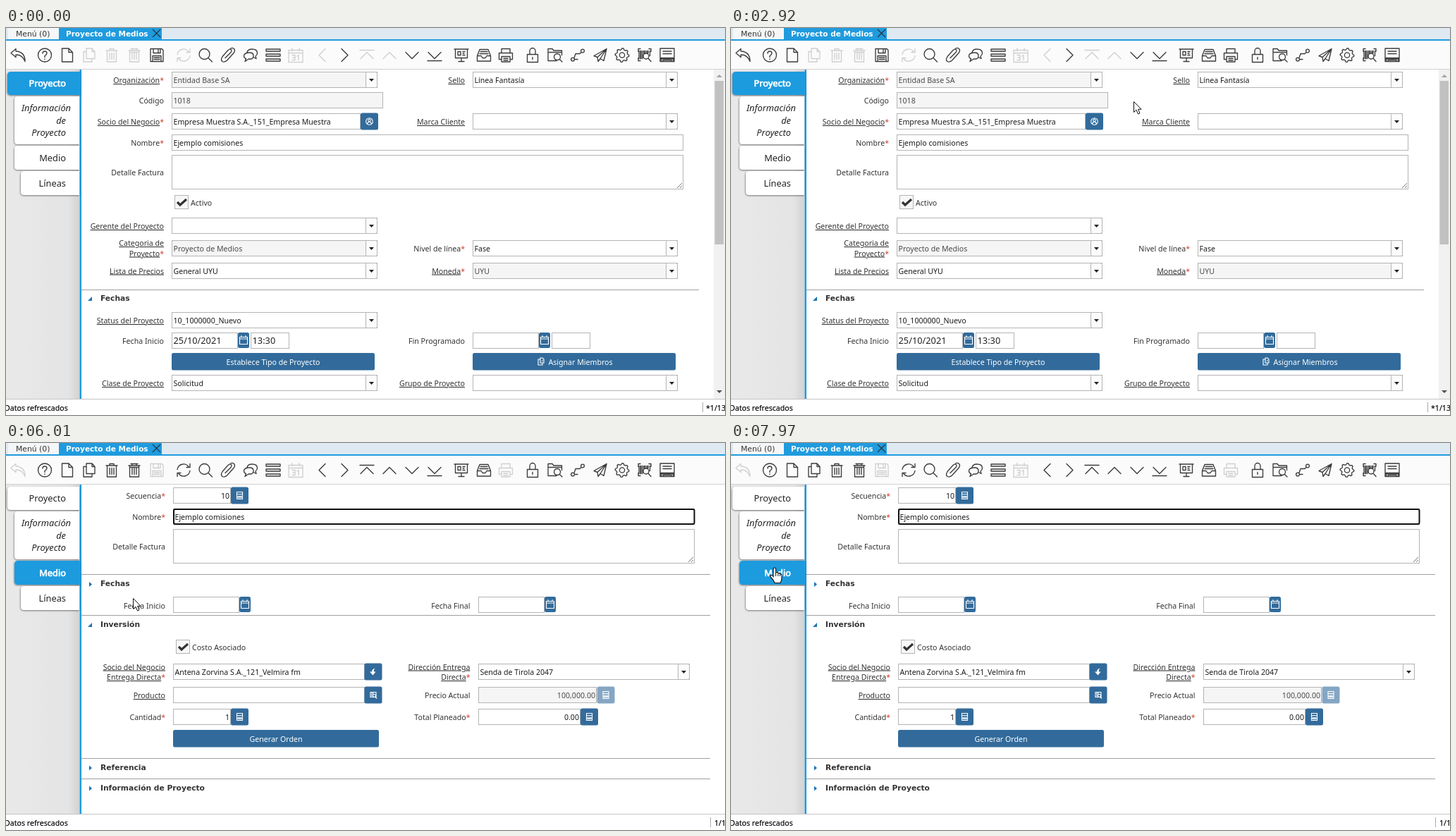
These frames come from a looping animation (1020 px wide and 549 px high, 8000 ms). An HTML page:

```html
<!DOCTYPE html>
<html lang="es">
<head>
<meta charset="utf-8">
<title>Proyecto de Medios</title>
<style>
html, body { margin: 0; width: 100%; height: 100%; overflow: hidden; background: #fff; }
svg { display: block; width: 100vw; height: 100vh; }
text { font: 10.6px "Noto Sans", "Open Sans", sans-serif; fill: #333; white-space: pre; }
.value { fill: #1c1c1c; }
.muted { fill: #4a4a4a; }
.date { font-size: 12.8px; fill: #222; }
.head { font: bold 10.7px "DejaVu Sans", sans-serif; }
.menu { font: 10.8px "DejaVu Sans", sans-serif; }
.title { font: bold 10.5px "DejaVu Sans", sans-serif; fill: #fff; }
.tab { font-size: 12.8px; fill: #222; }
.italic { font-style: italic; }
.active { fill: #fff; stroke: #fff; stroke-width: .7px; }
.white { fill: #fff; }
.status { fill: #000; stroke: #000; stroke-width: .15px; }
.u { text-decoration: underline; }
.req { fill: #d0402b; }
.icon { fill: none; stroke: #3c3c3c; stroke-width: 1.35; stroke-linejoin: round; stroke-linecap: round; }
.off { stroke: #d0d0d0; }
.tiny { fill: none; stroke: #fff; stroke-width: 1.1; }
</style>
</head>
<body>
<svg id="stage" viewBox="0 0 1020 549" preserveAspectRatio="none"></svg>
<script>
const LOOP = 8000, SWITCH = 5250, FOCUS = 5310, BLINK = 530;
const BLUE = '#1f9bde', BUTTON = '#326b9b', BORDER = '#b4b4b4';

const rect = (x, y, w, h, fill, extra = '') =>
  `<rect x="${x}" y="${y}" width="${w}" height="${h}" fill="${fill}" ${extra}/>`;
const path = (d, extra) => `<path d="${d}" ${extra}/>`;
const text = (x, y, s, cls = '', anchor = 'start') =>
  `<text x="${x}" y="${y + 4}" class="${cls}" text-anchor="${anchor}">${s}</text>`;
const at = (x, y, s) => `<g transform="translate(${x} ${y})">${s}</g>`;
const circle = (x, y, r) => `M${x - r} ${y}a${r} ${r} 0 1 0 ${2 * r} 0a${r} ${r} 0 1 0 ${-2 * r} 0`;

// Labels: "_" in front underlines, "*" at the end marks a required field.
function label(x, y, s) {
  const cls = s[0] === '_' ? 'u' : '', star = s.endsWith('*');
  const words = s.replace(/^_|\*$/g, '');
  return text(x, y, `<tspan class="${cls}">${words}</tspan>${star ? '<tspan class="req">*</tspan>' : ''}`, '', 'end');
}

const fields = [[], []];
let page = 0;
function box(x, y, w, h, value = '', o = {}) {
  fields[page].push([x, y, w, h]);
  const cls = o.cls || (o.gray ? 'muted' : 'value');
  return rect(x + .5, y + .5, w - 1, h - 1, o.gray ? '#f5f5f5' : '#fff', `stroke="${BORDER}"`) +
    (o.right ? text(x + w - 2, y + h / 2 + .5, value, cls, 'end') : text(x + 2.5, y + h / 2 + .5, value, cls));
}
const combo = (x, y, w, value, gray) => box(x, y, w, 23, value, { gray }) +
  rect(x + w - 16.5, y + .5, 16, 22, '#fcfcfc', `stroke="${BORDER}" rx="2"`) +
  path(`M${x + w - 12} ${y + 10}h7l-3.5 4z`, 'fill="#222"');
const area = (x, y, w, h) => box(x, y, w, h) +
  path(`M${x + w - 9} ${y + h - 2}l7-7m-3 7l3-3`, 'stroke="#777" fill="none"');
const button = (x, y, w, h, inner = '', fill = BUTTON) =>
  rect(x, y, w, h, fill, 'rx="2.5"') + at(x + w / 2, y + h / 2, inner);
const wide = (x, y, w, caption) => button(x, y, w, 24.5, text(0, .3, caption, 'white', 'middle'));
const tiny = d => path(d, 'class="tiny"');
// Square button that closes a 23 px high field.
const side = (x, y, inner, fill) => button(x, y - .5, 25, 24, inner, fill);
const calcIcon = tiny('M-4-5H4V5H-4ZM-4-2H4M-2 0V4M0 0V4M2 0V4M-4 2H4');
const calc = (x, y, fill) => side(x, y, calcIcon, fill);
const date = (x, y, value) => box(x, y, 94, 23, value, { cls: 'date' }) +
  button(x + 94, y, 16, 22, tiny('M-5.5-4.5H5.5V5.5H-5.5ZM-5.5-2H5.5M-3-7V-4M3-7V-4'));
const check = (x, y, caption) =>
  rect(x + .5, y + .5, 19, 19, '#f7f7f7', `stroke="${BORDER}"`) +
  path(`M${x + 4} ${y + 10}l4 4l9-8`, 'stroke="#333" stroke-width="3.2" fill="none"') +
  text(x + 23, y + 10.5, caption);
const rule = (y, end) => rect(107, y, end - 107, 1, '#a0a0a0');
const section = (y, name, open) => text(134, y, name, 'head') +
  path(open ? `M122 ${y - 2}v6h-6z` : `M118 ${y - 2}l4 3.5l-4 3.5z`, 'fill="#1b75b5"');

const gearShape = Array.from({ length: 32 }, (_, i) => {
  const a = i * Math.PI / 16, r = i % 4 < 2 ? 9.8 : 7.8;
  return `${i ? 'L' : 'M'}${(r * Math.cos(a)).toFixed(1)} ${(r * Math.sin(a)).toFixed(1)}`;
}).join('') + 'Z';
const trash = 'M-8-6.5H8M-3-6.5V-9H3V-6.5M-6.5-6.5V9.5H6.5V-6.5M-3-3V6M0-3V6M3-3V6';
const up = 'M-9 5L0-4L9 5', down = 'M-9-4L0 5L9-4';

// x, shape, page on which it is disabled (2 = both)
const icons = [
  [17, 'M-3-9L-10-3L-3 3V-.5Q6-1 10 9Q10-5-3-5.5Z', 1],
  [55, circle(0, 0, 9.5) + 'M-3-2.5Q-3-5.5 0-5.5T3-2.5Q3-1 0 1V3M0 5.5V6'],
  [87, 'M-7.5-9.5H2L7.5-4V9.5H-7.5ZM2-9.5V-4H7.5'],
  [118, 'M-4-9.5H4L8-5V5H-4ZM-4-5H-8V9.5H4V5M4-9.5V-5H8', 0],
  [150, trash, 0],
  [182, trash + 'M-6.5-4H6.5M-5-9H5', 0],
  [214, 'M-9-9H7L9-7V9H-9ZM-5-9V-3H5V-9M2-8V-4M-6 9V1H6V9M-4 3.5H4M-4 6H4', 1],
  [252, 'M-9-1A9 9 0 0 1 7-5M9-9V-4H4M9 1A9 9 0 0 1-7 5M-9 9V4H-4', 0],
  [283, circle(-1.5, -1.5, 7.5) + 'M4 4L9.5 9.5'],
  [315, 'M-4 4L4-4Q6-7 4-8Q2-9 0-7L-8 2Q-11 7-8 9Q-5 11-1 7L8-3Q11-7 8-9.5Q6-11 3-9'],
  [347, 'M-5-4Q-4-8.5 2-8.5Q9.5-8.5 9.5-3Q9.5 0 7 1.5L8 5L4 3M-3-3.5H0Q4-3 4 1Q4 5 0 5.5H-3L-8 9L-6.5 5Q-9.5 4-9.5 1Q-9-3-3-3.5Z'],
  [379, 'M-10-8.5H10V-5.5H-10ZM-10-1.5H10V1.5H-10ZM-10 5.5H10V8.5H-10Z'],
  [411, 'M-10-7H10V10H-10ZM-10-3H10M-5-10V-6M5-10V-6M-5 0H-1V7H-5M-1 3.5H-4M2 1.5L4 0V7', 2],
  [449, 'M4-9L-5 0L4 9', 0],
  [480, 'M-4-9L5 0L-4 9'],
  [512, up + 'M-10-7H10', 0],
  [544, up, 0],
  [576, down],
  [608, down + 'M-10 8H10'],
  [646, 'M-10-8.5H10M-8.5-8.5V4H8.5V-8.5M0 4V8M-4 9H4M-5-5H-1V0H-5ZM2-5H5M2-2.5H4M2 0H5'],
  [678, 'M-9.5 1L-6-8H6L9.5 1V8.5H-9.5ZM-9.5 1H-4L-2 4H2L4 1H9.5M-5-5H5M-6-2H6'],
  [709, 'M-6-3V-9H6V-3M-6 6H-9.5V-3H9.5V6H6M-6 2H6V9.5H-6ZM-3 4.7H3M-3 7.2H3', 1],
  [747, 'M-7.5-1H7.5V10H-7.5ZM-4-1V-6A4 4 0 0 1 4-6V-1M0 3V6'],
  [779, 'M2 8H-10V-9H-4L-2-6.5H9.5V0M-10-4H9.5' + circle(3, 2.5, 4.5) + 'M6.5 6L10 9.5'],
  [811, circle(-7, 6, 2.4) + circle(7, -6, 2.4) + 'M-5 4L-3-2H3L5-4M-4.5 6H0'],
  [843, 'M9-9L-9 1L-4 3L-3 9L0 5L5 8ZL-4 3M9-9L0 5'],
  [874, gearShape + circle(0, 0, 3.6)],
  [906, 'M-9-5V-9H-6M6-9H9V-5M-9 4V8H-6M-8-6V5M-6-6V5M-5-6V5M-3-6V5M-1-6V-2M0-6V-2M2-6V-3M4-6V-3M5-6V-3M7.5-6V1' + circle(2, 1.5, 4) + 'M5 4.5L9 9'],
  [938, 'M-10-9.5H10V4H-10ZM-6-5.5H6M-6-2H6M-10 5.3H10M-10 4V9H-6M-8.5 5V9M-6 9V7H6V9ZM6 9H10V4M8.5 5V9']
];
const toolbar = p => icons.map(([x, d, off]) =>
  at(x, 38.5, path(d, `class="icon ${off === 2 || off === p ? 'off' : ''}"`))).join('');

const tabs = [[2, 62, 33, 'Proyecto'], [12, 97, 68], [12, 167, 34, 'Medio'], [21, 203, 34, 'Líneas']];
const sidebar = current => tabs.map(([x, y, h, name], i) => {
  const on = i === current, r = 5, right = on ? 106 : 104;
  const d = `M${right} ${y}H${x + r}q${-r} 0 ${-r} ${r}v${h - 2 * r}q0 ${r} ${r} ${r}H${right}z`;
  return path(d, `fill="${on ? BLUE : '#fff'}" filter="url(#shade)"`) +
    (name ? text(85, y + h / 2 + .5, name, 'tab ' + (on ? 'active' : ''), 'end')
      : text(92, 114, 'Información', 'tab italic', 'end') + text(85, 131.5, 'de', 'tab italic', 'end') +
        text(85, 149, 'Proyecto', 'tab italic', 'end'));
}).join('');

const personIcon = tiny(circle(0, 0, 4.8) + circle(0, -1.5, 1.7) + 'M-3 3.5Q-2 .5 0 .5T3 3.5');

function projectPage() {
  const l = 224, r = 651, x = 235, x2 = 662;
  return label(l, 74, '_Organización*') + combo(x, 62, 292, 'Entidad Base SA', true) +
    label(r, 74, '_Sello') + combo(x2, 62, 291, 'Línea Fantasía') +
    label(l, 103, 'Código') + box(x, 91, 300, 23, '1018', { gray: true }) +
    label(l, 133, '_Socio del Negocio*') + box(x, 121, 268, 23, 'Empresa Muestra S.A._151_Empresa Muestra') +
    side(503, 121, personIcon) +
    label(r, 133, '_Marca Cliente') + combo(x2, 121, 291) +
    label(l, 163, 'Nombre*') + box(x, 151, 726, 23, 'Ejemplo comisiones') +
    label(l, 204.5, 'Detalle Factura') + area(x, 180, 726, 49) +
    check(239, 237, 'Activo') +
    label(l, 281, '_Gerente del Proyecto') + combo(x, 269, 292) +
    label(l, 305, '_Categoria de') + label(l, 319.5, '_Proyecto*') + combo(x, 301, 292, 'Proyecto de Medios', true) +
    label(r, 312.5, 'Nivel de línea*') + combo(x2, 301, 291, 'Fase') +
    label(l, 344.5, '_Lista de Precios') + combo(x, 333, 292, 'General UYU') +
    label(r, 344.5, '_Moneda*') + combo(x2, 333, 291, 'UYU', true) +
    rule(371, 983) + section(383, 'Fechas', true) +
    label(l, 415, '_Status del Proyecto') + combo(x, 403, 292, '10_1000000_Nuevo') +
    label(l, 443.5, 'Fecha Inicio') + date(x, 432, '25/10/2021') + box(347, 432, 55, 23, '13:30', { cls: 'date' }) +
    label(r, 443.5, 'Fin Programado') + date(x2, 432, '') + box(774, 432, 55, 23) +
    wide(x, 461, 288, 'Establece Tipo de Proyecto') +
    wide(x2, 461, 288, '<tspan dx="9">Asignar Miembros</tspan>') +
    at(759, 473, tiny('M-1-5H2L4-3V2H-1ZM-1-3H-4V5H2V2M1-1H3')) +
    label(l, 504, '_Clase de Proyecto') + combo(x, 492, 292, 'Solicitud') +
    label(r, 504, '_Grupo de Proyecto') + combo(x2, 492, 291) +
    rect(1004, 59, 16, 467, '#f1f1f1') + rect(1005.5, 75, 12.5, 232, '#c1c1c1') +
    path('M1008 70l4-4l4 4z', 'fill="#a3a3a3"') + path('M1008 514l4 4l4-4z', 'fill="#505050"');
}

function mediaPage() {
  const l = 226, r = 658.5, x = 237, x2 = 670;
  return label(l, 75, 'Secuencia*') + box(x, 63, 82, 23, '10', { right: true }) + calc(319, 63) +
    label(l, 105, 'Nombre*') + box(x, 93, 740, 23, 'Ejemplo comisiones') +
    label(l, 147, 'Detalle Factura') + area(x, 122, 740, 49) +
    rule(186, 999) + section(199, 'Fechas') +
    label(l, 231, 'Fecha Inicio') + date(x, 218, '') + label(r, 231, 'Fecha Final') + date(x2, 218, '') +
    rule(244, 999) + section(257, 'Inversión', true) +
    check(241, 279, 'Costo Asociado') +
    label(l, 317.5, '_Socio del Negocio') + label(l, 332, '_Entrega Directa*') +
    box(x, 313, 272, 23, 'Antena Zorvina S.A._121_Velmira fm') +
    side(508.5, 313, path('M3-5Q-2-4-2 0H-5L-.5 5L3.5 0H1Q0-3 3-5Z', 'fill="#fff"')) +
    label(r, 317.5, '_Dirección Entrega') + label(r, 332, '_Directa*') + combo(x2, 313, 300, 'Senda de Tirola 2047') +
    label(l, 358, '_Producto') + box(x, 346, 272, 23) +
    side(508.5, 346, tiny('M-4-4H4V3H-4ZM-2-4V2M0-4V0' + circle(1.5, 1, 2) + 'M3 3L5 5')) +
    label(r, 358, 'Precio Actual') + box(x2, 346, 168, 23, '100,000.00', { gray: true, right: true }) + calc(838.5, 346, '#84a6c4') +
    label(l, 389, 'Cantidad*') + box(x, 377, 82, 23, '1', { right: true }) + calc(319, 377) +
    label(r, 389, 'Total Planeado*') + box(x2, 377, 145, 23, '0.00', { right: true }) + calc(815, 377) +
    wide(x, 407, 292, 'Generar Orden') +
    rule(447, 999) + section(459.5, 'Referencia') + rule(476, 999) + section(488.5, 'Información de Proyecto');
}

function view(p, form, current, counter, split) {
  page = p;
  return `<g id="page${p}">${toolbar(p)}<g clip-path="url(#body)">${form()}</g>${sidebar(current)}` +
    text(1021, 539, counter, 'status', 'end') + rect(split, 531, 1, 14, '#aaa') + '</g>';
}

const pointer = {
  arrow: path('M.5.5V15.5L4 12.2L6.5 18L9 17L6.6 11.3H11Z', 'fill="#fff" stroke="#111"'),
  beam: path('M-3-7.5H-1L0-6.5L1-7.5H3M0-6.5V6.5M-3 7.5H-1L0 6.5L1 7.5H3', 'fill="none" stroke="#222"'),
  hand: path('M-2 12.5V1.8Q-2 0-.2 0T1.6 1.8V6.8Q4.8 5.6 4.8 8Q7.6 7 7.6 9Q10 8.5 10 10.5V15Q10 18 8 21.5H0Q-1 18-5 14Q-7 11-5.2 10.3Q-4 10-2 12.5Z',
    'fill="#fff" stroke="#111" stroke-width="1.2"') +
    path('M1.6 7V12M4.8 8.5V12M7.6 9.5V12', 'fill="none" stroke="#111"')
};

document.getElementById('stage').innerHTML =
  `<defs><clipPath id="body"><rect x="107" y="59" width="913" height="467"/></clipPath>
   <filter id="shade" x="-10%" y="-10%" width="120%" height="130%"><feDropShadow dx="-.5" dy="1" stdDeviation="1.2" flood-opacity=".5"/></filter>
   <linearGradient id="side"><stop stop-color="#e9e9e9"/><stop offset=".85" stop-color="#e4e4e4"/><stop offset="1" stop-color="#d2d2d2"/></linearGradient></defs>` +
  rect(0, 0, 1020, 549, '#fff') + rect(0, 0, 1020, 17, '#dfe9f1') +
  rect(3, 0, 72, 17, '#f5f6f7') + text(14, 7.5, 'Menú (0)', 'menu') +
  rect(75, 0, 146, 17, BLUE) + text(85, 7.5, 'Proyecto de Medios', 'title') +
  path('M208 2l11 11m0-11l-11 11', 'stroke="#243746" stroke-width="1.3"') +
  rect(0, 16, 1020, 2, BLUE) + rect(0, 18, 1020, 40, '#fbfbfb') + rect(0, 58, 1020, 1, '#d2d2d2') +
  rect(0, 59, 104.5, 467, 'url(#side)') + rect(104.5, 59, 2.5, 467, BLUE) +
  rect(0, 526, 1020, 1, '#c4c4c4') + text(-2, 539, 'Datos refrescados', 'status') +
  view(0, projectPage, 0, '*1/13', 988) + view(1, mediaPage, 2, '1/1', 999) +
  `<g id="focus">${rect(238, 94, 738.5, 21, 'none', 'stroke="#101010" stroke-width="2" rx="2"')}</g>
   <g id="caret">${rect(240, 98, 1, 14, '#000')}</g>
   <g id="pointer">${Object.entries(pointer).map(([k, s]) => `<g id="${k}">${s}</g>`).join('')}</g>`;

// start, end, then stops as [step, x, y]
const moves = [
  [290, 430, [0, 804, 375], [1, 690, 255], [2, 592, 163]],
  [1020, 1790, [0, 588, 160], [3, 535, 140], [8, 350, 97], [11, 276, 122]],
  [1840, 2180, [0, 285, 134], [2, 360, 153], [3, 420, 150], [5, 478, 120]],
  [2780, 3540, [0, 490, 117], [4, 651, 90], [5, 640, 95], [8, 360, 140], [11, 82, 177]],
  [5730, 6470, [0, 88, 181], [3, 180, 220], [6, 320, 280], [9, 386, 297]],
  [6540, 7160, [0, 370, 298], [3, 280, 318], [4, 278, 331], [5, 295, 336], [9, 409, 328]],
  [7430, 7970, [0, 395, 322], [3, 260, 265], [6, 80, 188], [7, 62, 177]]
];

function pointerAt(t) {
  const move = moves.filter(m => m[0] <= t).pop();
  if (!move) return null;
  const [start, end, ...stops] = move, last = stops[stops.length - 1][0];
  const k = Math.min(last, Math.floor((t - start) / (end - start) * last + .01));
  const i = Math.max(1, stops.findIndex(s => s[0] >= k));
  const a = stops[i - 1], b = stops[i], u = (k - a[0]) / (b[0] - a[0]);
  return [1, 2].map(n => Math.round(a[n] + (b[n] - a[n]) * u));
}
function shapeAt(x, y, p) {
  if (x < 104 && y > 60 && y < 237) return 'hand';
  return fields[p].some(f => x > f[0] && x < f[0] + f[2] && y > f[1] && y < f[1] + f[3]) ? 'beam' : 'arrow';
}

const el = id => document.getElementById(id);
const show = (id, on) => { el(id).style.display = on ? '' : 'none'; };
function draw(t) {
  const p = t >= SWITCH ? 1 : 0, focused = t >= FOCUS;
  show('page0', !p);
  show('page1', p);
  show('focus', focused);
  show('caret', focused && Math.floor((t - FOCUS) / BLINK) % 2 === 0);
  const pos = pointerAt(t);
  show('pointer', pos);
  if (!pos) return;
  el('pointer').setAttribute('transform', `translate(${pos[0]} ${pos[1]})`);
  const shape = shapeAt(...pos, p);
  Object.keys(pointer).forEach(k => show(k, k === shape));
}

const origin = performance.now();
function tick() {
  draw((performance.now() - origin) % LOOP);
  requestAnimationFrame(tick);
}
draw(0);
tick();
</script>
</body>
</html>
```
